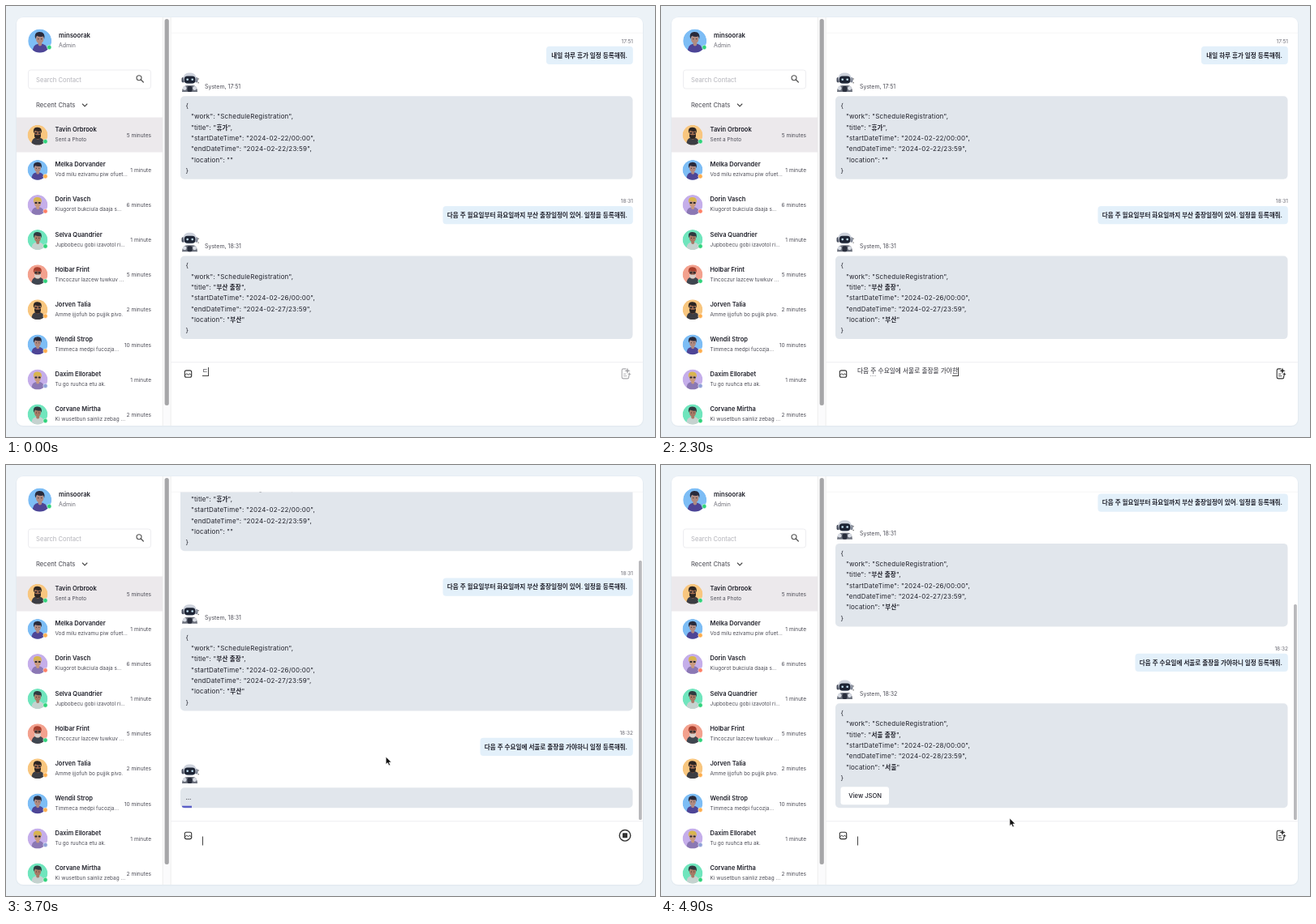
Write an HTML page that moves like this. It is 800 px wide and 532 px high and loops after 5000 ms.

```html
<!DOCTYPE html>
<html lang="ko">
<head>
<meta charset="utf-8">
<title>Chat</title>
<style>
html, body { margin: 0; width: 100%; height: 100%; overflow: hidden; background: #ecf2f7; }
body { position: relative; }
svg { display: block; }
text, #input { font-family: Inter, "Noto Sans CJK KR", "Noto Sans CJK", sans-serif; }
text { white-space: pre; }
#input { position: absolute; left: 242px; top: 446px; font-size: 7.7px; line-height: 10px; white-space: pre; color: #25252d; }
#input span { display: inline-block; height: 10px; vertical-align: top; }
#word.marked { border-bottom: 1px dotted #a9a9ad; }
#comp { border-bottom: 1px solid #444; }
#caret { width: 1px; height: 11px !important; background: #444; }
</style>
</head>
<body>
<svg id="stage" width="800" height="532" viewBox="0 0 800 532"></svg>
<div id="input"><span id="head"></span><span id="word"></span><span id="tail"></span><span id="comp"></span><span id="caret"></span></div>
<script>
const $ = id => document.getElementById(id);
const INK = '#20212b', GRAY = '#6b6b75';

// markup helpers
const label = (x, y, s, size, fill = INK, extra = '') =>
  `<text x="${x}" y="${y}" font-size="${size}" fill="${fill}" ${extra}>${s}</text>`;
const rect = (x, y, w, h, fill, r = 0, extra = '') =>
  `<rect x="${x}" y="${y}" width="${w}" height="${h}" rx="${r}" fill="${fill}" ${extra}/>`;
const circle = (x, y, r, fill, extra = '') => `<circle cx="${x}" cy="${y}" r="${r}" fill="${fill}" ${extra}/>`;
const path = (d, stroke, w = 1, fill = 'none') =>
  `<path d="${d}" fill="${fill}" stroke="${stroke}" stroke-width="${w}" stroke-linecap="round" stroke-linejoin="round"/>`;
const group = (id, body, extra = '') => `<g id="${id}" ${extra}>${body}</g>`;
const END = 'text-anchor="end"', BOLD = 'font-weight="600"';

// avatars: background, hair, skin, shirt, glasses, beard
const LOOKS = {
  amber: ['#f8c67f', '#2c2523', '#a87052', '#3c3d43', 1, '#2c2523'],
  blue: ['#7dbdf5', '#292a3b', '#b08a80', '#4e4596', 0, ''],
  lilac: ['#c5aeea', '#d8b64d', '#c99a7e', '#8b78b4', 1, ''],
  mint: ['#70e5bd', '#303b40', '#a77965', '#c5d2cf', 0, ''],
  coral: ['#f3a18e', '#a9402f', '#8d594a', '#3f4650', 1, '#d8cfca']
};

function avatar(x, y, scale, look) {
  const [bg, hair, skin, shirt, glasses, beard] = LOOKS[look];
  return `<g transform="translate(${x} ${y}) scale(${scale})" clip-path="url(#round)">` +
    circle(0, 0, 12.4, bg) +
    `<path d="M-7.5 13Q-8 4-2 3.2H3Q8.5 5 9 13Z" fill="${shirt}"/>` +
    rect(-1.8, 1, 4, 4.5, skin, 2) +
    `<ellipse cx="0" cy="-2" rx="4" ry="5" fill="${skin}"/>` +
    (beard ? `<path d="M-4-1.2Q-2 .6 0 0Q2 .6 4-1.2Q4.6 4.6 0 5Q-4.6 4.6-4-1.2" fill="${beard}"/>` : '') +
    `<path d="M-4.8-2Q-6.4-9-1-9.4Q6-10 4.8-2L3.6-4.6Q0-3.6-3.1-5.4Z" fill="${hair}"/>` +
    (glasses ? rect(-3.6, -3.4, 3.1, 2, '#28282c', 1) + rect(.7, -3.4, 3.1, 2, '#28282c', 1)
             : circle(-1.6, -2, .5, '#222') + circle(1.8, -2, .5, '#222')) +
    '</g>';
}

const dot = (x, y, fill) => circle(x, y, 2.7, fill, 'stroke="#fff" stroke-width=".5"');

function robot(y) {
  return `<g transform="translate(226.5 ${y})">` +
    `<path d="M-9.5 12Q-9 4-3 4H4Q9 4 9.5 12Z" fill="#6d727e"/>` +
    circle(-6.3, 7.5, 2.4, '#d9dde5') + circle(6, 7.5, 2.4, '#d9dde5') + rect(-3, 5, 6, 7, '#292e3c', 2) +
    rect(-10, -6, 3.5, 6.5, '#4b5161', 1.7) + rect(6.5, -6, 3.5, 6.5, '#7d8494', 1.7) +
    rect(-8, -11.5, 16, 14, '#cdd2dc', 6.5) + rect(-6.8, -7.5, 13.8, 9, '#1d2434', 4) +
    circle(-2.8, -3.2, 1.3, '#c5e4f8') + circle(3.2, -3.2, 1.3, '#c5e4f8') +
    circle(10.6, -4, .7, '#555') + circle(10.6, .8, .7, '#555') + '</g>';
}

const CONTACTS = [
  ['Tavin Orbrook', 'Sent a Photo', '5 minutes', 'amber', '#2fd37b'],
  ['Melka Dorvander', 'Vod milu ezivamu piw ofuet...', '1 minute', 'blue', '#ffae4d'],
  ['Dorin Vasch', 'Kiugorot bukciula daaja s...', '6 minutes', 'lilac', '#ff8066'],
  ['Selva Quandrier', 'Jupbobecu gobi izavotol ri...', '1 minute', 'mint', '#2fd37b'],
  ['Holbar Frint', 'Tincoczur lazcew tuwkuv ...', '5 minutes', 'coral', '#2fd37b'],
  ['Jorven Talia', 'Amme ijjofuh bo pujjik pivo.', '2 minutes', 'amber', '#ffae4d'],
  ['Wendil Strop', 'Timmeca medpi fucozja...', '10 minutes', 'blue', '#ffae4d'],
  ['Daxim Ellorabet', 'Tu go ruuhca etu ak.', '1 minute', 'lilac', '#8fa0d8'],
  ['Corvane Mirtha', 'Ki wusetbun sainliz zebag ...', '2 minutes', 'mint', '#2fd37b']
];

function contact([name, note, ago, look, status], i) {
  const y = 159.2 + 43.1 * i;
  return (i ? '' : rect(13, 137.5, 180, 43, '#ece9ec')) +
    avatar(39, y, 1, look) + dot(48.5, y + 8, status) +
    label(60.5, y - 4, name, 7.5, INK, BOLD) +
    label(60.5, y + 8, note, 6.45, '#4c4c56') +
    label(179, y + 2.7, ago, 6.6, '#4c4c56', END);
}

const sidebar =
  avatar(41.7, 43, 1.17, 'blue') + dot(53.3, 51, '#2fd37b') +
  label(65, 39, 'minsoorak', 7.7, INK, BOLD) + label(65, 51, 'Admin', 6.9, GRAY) +
  rect(27.5, 79, 151, 23, '#fff', 3, 'stroke="#ededf0"') +
  label(37, 94, 'Search Contact', 7.65, '#b3b3ba') +
  circle(164, 88.7, 3, 'none', 'stroke="#555" stroke-width="1.1"') + path('M166.3 91l3 3', '#555', 1.3) +
  label(37, 125, 'Recent Chats', 7.7, '#44444d') + path('M94.3 121l2.8 2.8l2.8-2.8', '#444', 1.1) +
  CONTACTS.map(contact).join('') +
  rect(193, 14, 10.5, 504, '#fbfbfc') + path('M193.2 14V518M203.2 14V518', '#e8e8ea', .7) +
  rect(195.6, 16, 5.2, 477, '#a6a6a8', 2.5);

// chat
const PITCH = 197.3, LINE = 13.35;
const CHAT = [
  ['17:51', 666, '내일 하루 휴가 일정 등록해줘.', '휴가', '02-22', '02-22', ''],
  ['18:31', 538.5, '다음 주 월요일부터 화요일까지 부산 출장일정이 있어. 일정을 등록해줘.', '부산 출장', '02-26', '02-27', '부산'],
  ['18:32', 584.5, '다음 주 수요일에 서울로 출장을 가야하니 일정 등록해줘.', '서울 출장', '02-28', '02-28', '서울']
];
const TYPED = CHAT[2][2];
const hangul = s => `<tspan font-size="7.5" ${BOLD}>${s}</tspan>`;

function answer([time, , , title, from, to, place], last) {
  const lines = ['{', '"work": "ScheduleRegistration",', `"title": "${hangul(title)}",`,
    `"startDateTime": "2024-${from}/00:00",`, `"endDateTime": "2024-${to}/23:59",`,
    `"location": "${hangul(place)}"`, '}'];
  return label(245, 101.5, 'System, ' + time, 7, '#4c4c56') +
    rect(215, 111.2, 557.5, last ? 129 : 102.6, '#e1e6ec', 5) +
    lines.map((s, i) => label(s.length > 1 ? 228 : 221.5, 125.9 + LINE * i, s, 8, INK, 'letter-spacing=".2"')).join('') +
    (last ? rect(221.5, 214.2, 59.5, 22, '#fff', 3) + label(231.3, 228, 'View JSON', 7.6, INK, 'font-weight="500"') : '');
}

const loading = rect(215, 111.2, 557.5, 25, '#e1e6ec', 5) + label(221.5, 126, '...', 8, INK) +
  `<g clip-path="url(#loadbox)">${rect(217, 133.7, 12, 3, '#5b5fc7', 0, 'id="bar"')}</g>`;

function message(m, i) {
  const last = i === 2;
  return group('msg' + i,
    label(773, 46, m[0], 6.5, GRAY, END) +
    rect(m[1], 49.8, 772.8 - m[1], 22.2, '#e3f0fa', 4) +
    label(766, 63.7, m[2], 7.58, INK, END + ' ' + BOLD) + robot(94) +
    (last ? group('loading', loading) + group('answer', answer(m, true)) : answer(m, false)),
    `transform="translate(0 ${PITCH * i})"`);
}

const reply = circle(0, 0, 9.5, '#fff') +
  '<path d="M-3.5-.5L-.3-3.2V-1.5Q3.3-1.3 3.4 2.8Q2.2.7-.3.7V2.3Z" fill="#25252d"/>';

const imageIcon = rect(220.3, 453.2, 8.4, 8.4, 'none', 2, 'stroke="#333" stroke-width="1.1"') +
  path('M220.7 459l2-2l1.8 1.6l2-1.5l2 2', '#333', 1);
const sendIcon = path('M764 451.2H761Q759.2 451.2 759.2 453V461.5Q759.2 463.2 761 463.2H766Q767.7 463.2 767.7 461.5V459.5', 'currentColor', 1.1) +
  path('M761.5 457.5h2.5M761.5 460h3.5', 'currentColor', .9) +
  '<path d="M766 449.8l1 2.7l2.7 1l-2.7 1l-1 2.7l-1-2.7l-2.7-1l2.7-1ZM768.4 455.3l.7 1.7l1.7.7l-1.7.7l-.7 1.7l-.7-1.7l-1.7-.7l1.7-.7Z" fill="currentColor"/>';
const stopIcon = circle(763, 457.3, 6.8, 'none', 'stroke="#333" stroke-width="1.4"') + rect(760, 454.3, 6, 6, '#333', .8);

$('stage').innerHTML =
  `<defs><clipPath id="round"><circle r="12.4"/></clipPath>
   <clipPath id="panel"><rect x="13" y="14" width="772" height="504" rx="8"/></clipPath>
   <clipPath id="view"><rect x="204" y="33.5" width="581" height="405.5"/></clipPath>
   <clipPath id="loadbox"><rect x="215" y="111.2" width="557.5" height="25" rx="5"/></clipPath></defs>` +
  rect(0, 0, 800, 532, '#ecf2f7') + rect(12, 13.5, 774, 506, '#e4ebf1', 9) + rect(13, 14, 772, 504, '#fff', 8) +
  `<g clip-path="url(#panel)">${sidebar}</g>` +
  path('M204 33.3H784.5', '#f4f4f6', .8) + path('M204 439.8H784.5', '#ededf0', .9) +
  `<g clip-path="url(#view)">${group('feed', CHAT.map(message).join(''))}${group('reply', reply)}</g>` +
  rect(780, 118, 3.8, 320, '#b9b9bc', 1.5, 'id="thumb"') +
  group('tools', imageIcon + group('send', sendIcon)) + group('stop', stopIcon) +
  rect(242, 458.5, 1, 11, '#444', 0, 'id="idle"') +
  group('cursor', '<path d="M0 0V9.6L2.2 7.6L3.8 11L5.5 10.2L4 7H7Z" fill="#111" stroke="#fff" stroke-width=".7"/>');

// Hangul keyboard: every key press gives [finished text, syllable being composed]
const LEADS = 'ㄱㄲㄴㄷㄸㄹㅁㅂㅃㅅㅆㅇㅈㅉㅊㅋㅌㅍㅎ';
const TAILS = ' ㄱㄲㄳㄴㄵㄶㄷㄹㄺㄻㄼㄽㄾㄿㅀㅁㅂㅄㅅㅆㅇㅈㅊㅋㅌㅍㅎ';
const WO = 14;

function keyPresses(text) {
  const keys = [];
  let open = null;
  [...text].forEach((ch, i) => {
    const code = ch.charCodeAt(0) - 0xAC00, done = text.slice(0, i);
    if (code < 0 || code > 11171) {
      keys.push([done + ch, '']);
      open = null;
      return;
    }
    const lead = Math.floor(code / 588), vowel = Math.floor(code % 588 / 28), tail = code % 28;
    const make = (v, t) => String.fromCharCode(0xAC00 + lead * 588 + v * 28 + t);
    // a lead consonant first lands under the open syllable before it
    keys.push(open === null ? [done, LEADS[lead]]
      : [text.slice(0, i - 1), String.fromCharCode(open + TAILS.indexOf(LEADS[lead]))]);
    if (vowel === WO) keys.push([done, make(vowel - 1, 0)]);
    keys.push([done, make(vowel, 0)]);
    if (tail) keys.push([done, ch]);
    open = tail ? null : ch.charCodeAt(0);
  });
  return keys;
}
const KEYS = keyPresses(TYPED);

const CLEAR = 3600, SENT = 3700, REPLIED = 4000, BLINK = 500;
// time and number of the key pressed by then
const PACE = [[0, 0], [1200, 20], [2300, 43], [3500, KEYS.length - 1]];
const POINTER = [[3600, 461.5, 382.5], [3700, 468.2, 360], [4800, 455, 386], [4900, 429.8, 436]];
const show = (id, on) => { $(id).style.display = on ? '' : 'none'; };
const move = (id, x, y) => $(id).setAttribute('transform', `translate(${x} ${y})`);

function keyAt(t) {
  const i = PACE.findIndex(p => p[0] > t);
  if (i < 0) return KEYS.length - 1;
  const [t0, k0] = PACE[i - 1], [t1, k1] = PACE[i];
  return Math.round(k0 + (k1 - k0) * (t - t0) / (t1 - t0));
}

function typing(t) {
  const n = keyAt(t), [done, comp] = KEYS[n];
  $('head').textContent = done.slice(0, 3);
  $('word').textContent = done.slice(3, 4);
  $('word').className = done.length > 4 ? 'marked' : '';
  $('tail').textContent = done.slice(4);
  $('comp').textContent = comp;
  show('comp', comp);
  $('send').style.color = n ? '#333' : '#a9a9ad';
}

function draw(t) {
  const sent = t >= SENT, replied = t >= REPLIED, busy = sent && !replied;
  show('input', t < CLEAR);
  typing(t);
  move('tools', 0, t < CLEAR ? -3.3 : 0);
  show('send', !busy);
  show('stop', busy);
  show('idle', sent && Math.floor((t - CLEAR) / BLINK) % 2 === 0);

  move('feed', 0, replied ? -211.6 : sent ? -107.6 : 0);
  show('msg2', sent);
  show('loading', busy);
  show('answer', replied);
  $('bar').setAttribute('x', 217 + (t - SENT) * .4);
  $('bar').setAttribute('width', 12 + Math.max(0, t - SENT));
  show('thumb', sent);
  $('thumb').setAttribute('y', replied ? 172 : 118);
  $('thumb').setAttribute('height', replied ? 266 : 320);

  const spot = POINTER.filter(p => p[0] <= t).pop();
  show('cursor', spot);
  if (spot) move('cursor', spot[1], spot[2]);
  show('reply', t >= CLEAR && t < 4900 && !busy);
  move('reply', 755.8, replied ? 386 : 400);
}

// ten pictures a second, with a little slack for a late start
const STEP = 100, LOOP = 5000, start = performance.now();
function tick() {
  const step = Math.floor((performance.now() - start) / STEP + .1);
  draw(step * STEP % LOOP);
  requestAnimationFrame(tick);
}
tick();
</script>
</body>
</html>
```
